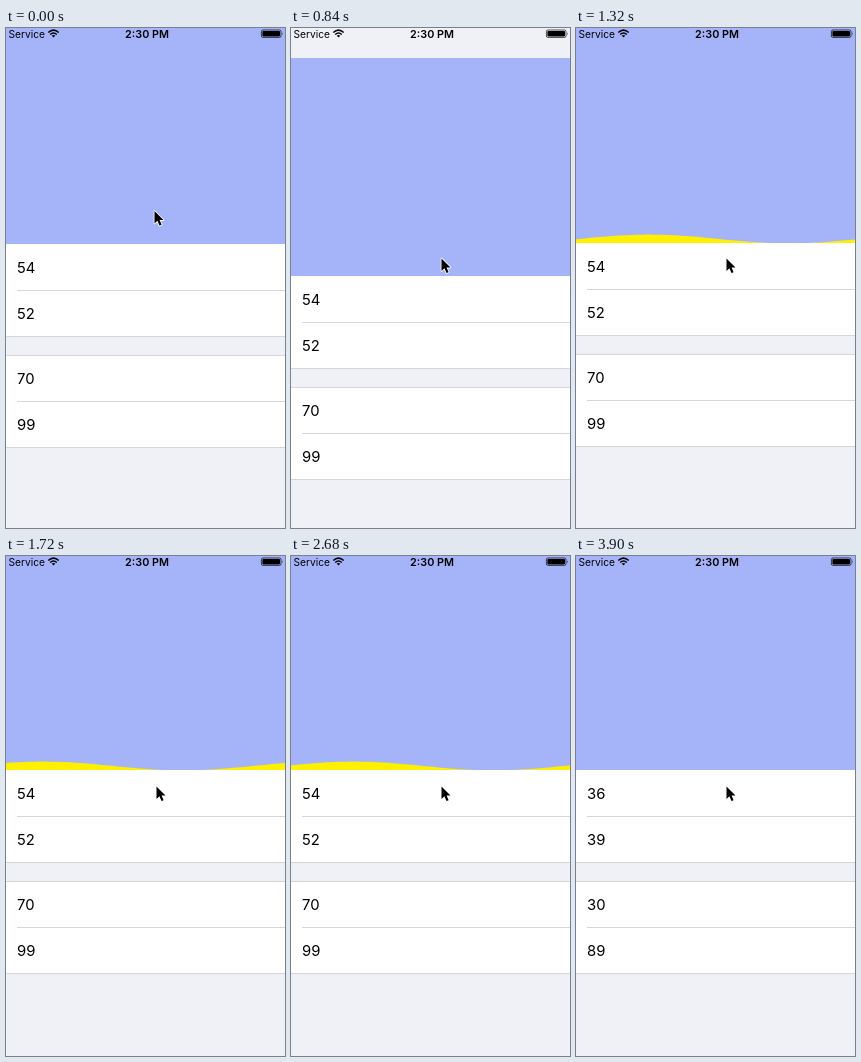
An HTML page that plays this animation: 279 px wide and 500 px high, repeating every 4140 ms.

```html
<!DOCTYPE html>
<html lang="en">
<head>
<meta charset="utf-8">
<title>Pull to refresh wave</title>
<style>
html, body { margin: 0; width: 100%; height: 100%; overflow: hidden; background: #f0f1f7; }
svg { display: block; width: 279px; height: 500px; }
text { font-family: Inter, Roboto, "Liberation Sans", sans-serif; }
.row { font-size: 14.8px; }
.lines { stroke: #d6d6da; stroke-width: 1; }
</style>
</head>
<body>
<svg viewBox="0 0 279 500">
  <!-- origin is the lower edge of the header -->
  <g id="list">
    <rect y="-218" width="279" height="218" fill="#a5b4f9"/>
    <path id="wave" fill="#fff000"/>
    <path d="M0 0h279v92H0zM0 111h279v92H0z" fill="#fff"/>
    <path class="lines" d="M11 46.5H279M0 92.5H279M0 111.5H279M11 157.5H279M0 203.5H279"/>
    <text class="row" x="11" y="28.5"></text>
    <text class="row" x="11" y="74.5"></text>
    <text class="row" x="11" y="139.5"></text>
    <text class="row" x="11" y="185.5"></text>
  </g>
  <text x="2.5" y="9.5" font-size="10.2">Service</text>
  <text x="141" y="9.5" font-size="10.8" font-weight="600" text-anchor="middle">2:30 PM</text>
  <g fill="none" stroke="#000" stroke-width="1.5">
    <path d="M42.3 4.5Q47.5 -.3 52.7 4.5M44.2 6.5Q47.5 3.5 50.8 6.5"/>
    <path d="M45.7 7.6Q47.5 6.2 49.3 7.6L47.5 9.4z" fill="#000" stroke="none"/>
    <rect x="255.4" y="2" width="19.6" height="7.4" rx="1.5" stroke-width=".7"/>
    <rect x="256.4" y="3" width="17.6" height="5.4" rx=".8" fill="#000" stroke="none"/>
    <path d="M276 4.4q1.2 1.3 0 2.6z" fill="#000" stroke="none"/>
  </g>
  <path id="cursor" d="M0 0V12.5L2.9 9.8 5 14.6 7.1 13.7 5.1 9.1H9z" stroke="#fff" stroke-width="1.6" paint-order="stroke" stroke-linejoin="round"/>
</svg>
<script>
const LOOP = 4140, WIDTH = 279, PULLED = 600, RELEASED = 840, RELOADED = 3060, HIDDEN = 3900;
const [list, wave, cursor] = ['list', 'wave', 'cursor'].map(id => document.getElementById(id));
const rows = document.querySelectorAll('.row');
const before = [54, 52, 70, 99], after = [36, 39, 30, 89];

const smooth = (t, from, to) => {
  const p = Math.min(1, Math.max(0, (t - from) / (to - from)));
  return p * p * (3 - 2 * p);
};

// Eased drag, then a critically damped return after release.
function offset(t) {
  if (t < RELEASED) return -2 + 32 * smooth(t, 0, PULLED);
  const k = (t - RELEASED) * 0.0109;
  return -4 + 34 * (1 + k) * Math.exp(-k);
}

function wavePath(t) {
  const crest = 73 + 0.61 * (t - 1320);
  let d = 'M0 0';
  for (let x = 0; x <= WIDTH; x += 3) {
    const y = -4 - 4.4 * Math.cos((x - crest) * 2 * Math.PI / 280);
    d += `L${x} ${Math.min(0, y).toFixed(2)}`;
  }
  return d + `V0z`;
}

let start;
function draw(now) {
  start ??= now;
  const t = (now - start) % LOOP, drag = smooth(t, 0, PULLED);
  list.setAttribute('transform', `translate(0 ${218 + Math.round(offset(t))})`);
  cursor.setAttribute('transform', `translate(${148.5 + 2 * drag} ${183 + 47.5 * drag})`);
  wave.setAttribute('d', wavePath(t));
  wave.setAttribute('opacity', t > RELEASED + 10 ? 1 - smooth(t, RELOADED, HIDDEN) : 0);
  const values = t < RELOADED ? before : after;
  rows.forEach((row, i) => row.textContent = values[i]);
  requestAnimationFrame(draw);
}
requestAnimationFrame(draw);
</script>
</body>
</html>
```
